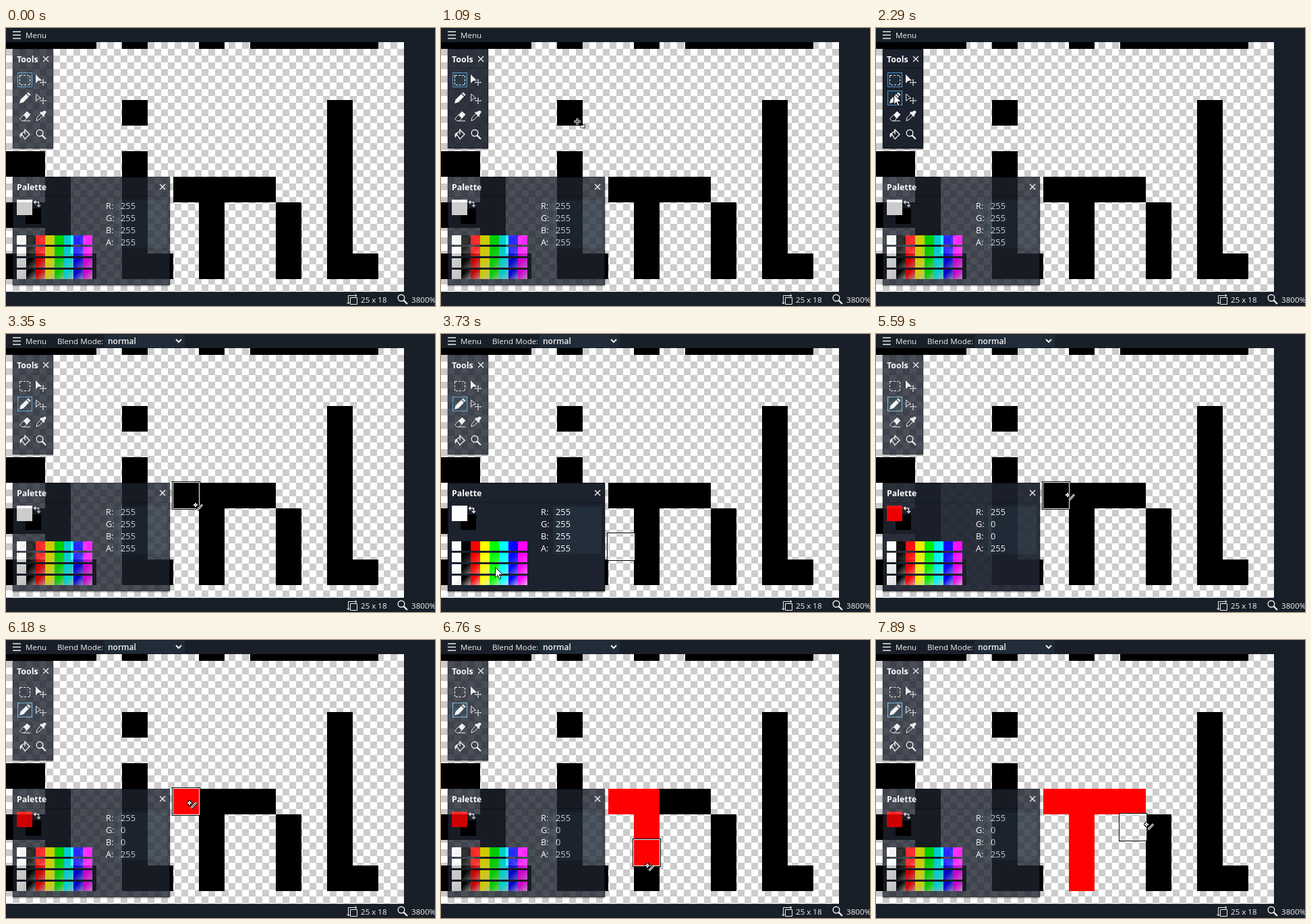
An HTML page for the animation above (7990 ms loop, 636 by 413 pixels).

```html
<!DOCTYPE html>
<html lang="en">
<head>
<meta charset="utf-8">
<title>Pixel editor</title>
<style>
html, body { margin: 0; width: 100%; height: 100%; overflow: hidden; background: #181f28; }
svg { display: block; }
text { font: 11.6px "Open Sans", "Noto Sans", sans-serif; fill: #f4f4f4; }
.title { font-size: 12.4px; font-weight: bold; fill: #fff; }
.value { font-size: 12.8px; fill: #fff; }
.line { fill: none; stroke: #f0f0f0; stroke-width: 1.4; }
.thin { stroke-width: 1; }
.panel { fill: #1b242d; stroke: #0b1015; }
.active { fill: #1d2c39; stroke: #4d94cc; }
.solid { fill: #f4f4f4; }
.crisp, .crisp * { shape-rendering: crispEdges; }
</style>
</head>
<body>
<svg width="636" height="413" viewBox="0 0 636 413">
  <defs>
    <pattern id="checker" y="21" width="20" height="20" patternUnits="userSpaceOnUse">
      <path fill="#fff" d="M0 0H20V20H0Z"/>
      <path fill="#ccc" d="M10 0H20V10H10ZM0 10H10V20H0Z"/>
    </pattern>
    <filter id="shadow" x="-10%" y="-10%" width="120%" height="120%">
      <feDropShadow dx="0" dy="1" stdDeviation="1.2" flood-opacity=".6"/>
    </filter>
    <path id="cross" class="line thin" d="M-4 0H4M0 -4V4M-4 -1V1M4 -1V1M-1 -4H1M-1 4H1"/>
    <g id="glass" class="line"><circle r="4.8"/><path d="M3.4 3.4L9 9" style="stroke-width:2.2"/></g>
    <path id="close" class="line" d="M-4 -4L4 4M4 -4L-4 4"/>
    <path id="pencilLine" d="M2.5 7.5L10 -.5"/>
  </defs>

  <g class="crisp">
    <path fill="url(#checker)" d="M0 21H590V392H0Z"/>
    <path d="M0 21H134V31H0ZM172 21H210V31H172ZM286 21H324V31H286ZM362 21H552V31H362Z
      M0 183H58V221H96V373H0V335H58V297H0V259H58V221H0ZM96 335H134V373H96Z
      M172 107H210V145H172ZM172 183H210V335H248V373H172Z
      M248 221H400V259H324V373H286V259H248ZM400 259H438V373H400Z
      M476 107H514V335H552V373H476Z"/>
    <path id="paint" fill="#f00"/>
    <g id="cell" fill="none">
      <path stroke="#000" d="M-1.5 -1.5H39.5V39.5H-1.5Z"/>
      <path stroke="#fff" d="M-.5 -.5H38.5V38.5H-.5Z"/>
    </g>
  </g>

  <path fill="#181f28" d="M0 0H636V21H0ZM0 392H636V413H0Z"/>
  <path class="line" d="M10 5.5H22M10 10.5H22M10 15.5H22"/>
  <text x="29" y="15">Menu</text>
  <g id="blend">
    <path fill="#202c38" d="M146 1H265V20H146Z"/>
    <text x="76" y="15">Blend Mode:</text>
    <text x="151" y="15" style="font-size:12px;font-weight:600">normal</text>
    <path class="line" d="M252 8L256 12L260 8" style="stroke-width:2"/>
  </g>
  <path class="line thin" d="M510.5 400.5H520.5V410.5H510.5ZM507.5 410V397.5H520M505.5 407.5L507.5 410L509.5 407.5M517.5 395.5L520 397.5L517.5 399.5"/>
  <text x="526" y="408">25 x 18</text>
  <use href="#glass" x="586" y="401"/>
  <text x="601" y="408">3800%</text>

  <g id="tools">
    <rect class="panel" x="10.5" y="31.5" width="59" height="147" filter="url(#shadow)"/>
    <path stroke="#111820" d="M11 59.5H69"/>
    <text class="title" x="16" y="51">Tools</text>
    <use href="#close" x="59" y="46"/>
    <rect id="selectBox" class="active" x="17.5" y="66.5" width="21" height="21"/>
    <rect id="pencilBox" class="active" x="17.5" y="93.5" width="21" height="21"/>
    <path class="line thin crisp" stroke-dasharray="3 2" d="M20.5 70.5H35.5V84.5H20.5Z"/>
    <path class="solid" d="M44 69V82L47.5 78.5L53 78Z"/>
    <use href="#cross" x="55" y="81"/>
    <path class="solid" d="M20 112L21.5 106.5L30 98L34 102L25.5 110.5ZM31 97L33 95.5L36.5 99L35 101Z"/>
    <path class="line thin" d="M44.7 98V108.5L48 105L52 104.5Z"/>
    <use href="#cross" x="55" y="108"/>
    <path class="solid" d="M26 129L31 124L36 128.5L30.5 134.5Z"/>
    <path class="line thin" d="M31 124L36 128.5L27 138H23.5L20.5 135L26 129M26 138H36"/>
    <path class="solid" d="M51 127L54 130L57 129L59.5 125.5Q60 122 56 123L53 125L52 124L50 126L56 132L58 130Z"/>
    <path class="line thin" d="M52 127L46 133L45 138L49 136L55 130"/>
    <path class="solid" d="M24 155Q19 156 21 163L24 159Z"/>
    <path class="line" d="M23 157L29 152L35 158L28 165ZM28 158V150"/>
    <use href="#glass" x="50" y="156"/>
  </g>

  <g id="palette">
    <rect class="panel" x="10.5" y="221.5" width="232" height="160" filter="url(#shadow)"/>
    <path stroke="#111820" d="M11 250.5H242"/>
    <text class="title" x="16" y="241">Palette</text>
    <use href="#close" x="232" y="236"/>
    <path d="M29 268H52V291H29Z"/>
    <rect id="swatch" x="16" y="255" width="23" height="23"/>
    <path class="line" d="M44 256.5L41.5 259L44 261.5M42 259H48.5V265M46 263L48.5 265.5L51 263"/>
    <path fill="#222e3a" d="M166 256H238V327H166Z"/>
    <g id="channels"></g>
    <g id="swatches" class="crisp"></g>
  </g>

  <path id="arrow" fill="#fff" stroke="#000" d="M.5 .5V16L4 12.5L6.5 18L9 17L6.5 11.5H11.5Z"/>
  <g id="pen">
    <path fill="#fff" stroke="#000" d="M-1.5 -3.5H1.5V-1.5H3.5V1.5H1.5V3.5H-1.5V1.5H-3.5V-1.5H-1.5Z"/>
    <path d="M-.5 -.5H.5V.5H-.5Z"/>
    <use href="#pencilLine" stroke="#000" stroke-width="5"/>
    <use href="#pencilLine" stroke="#fff" stroke-width="3"/>
    <use href="#pencilLine" stroke="#000"/>
  </g>
  <g id="marquee" fill="none" stroke="#000">
    <path stroke="#fff" stroke-width="3" d="M-5 0H5M0 -5V5"/>
    <path d="M-5 0H5M0 -5V5"/>
    <path stroke-dasharray="2 1" d="M4.5 4.5H11.5V9.5H4.5Z"/>
  </g>
</svg>
<script>
const LOOP = 7990, STEP = 95, CELL = 38, LEFT = 20, TOP = 31;
const SELECT_PENCIL = 2470, PICK_RED = 4920, PEN_DOWN = 6180, PEN_UP = 7850;
const $ = id => document.getElementById(id);

// Pointer gestures: start and end time, then the corners of the path
const gestures = [
  [710, 1200, [463, 239], [28, 73]],
  [2290, 2290, [26, 98]],
  [2880, 3350, [40, 112], [281, 254]],
  [3450, 3640, [266, 300], [102, 353]],
  [3730, 4030, [80, 346], [29, 320], [51, 316]],
  [4530, 4530, [51, 317]],
  [5410, 5590, [130, 290], [284, 239]],
  [5690, 5990, [300, 240], [274, 243]],
  [6180, 6270, [272, 242], [300, 243]],
  [6470, 6850, [304, 264], [306, 358]],
  [7050, 7800, [308, 335], [328, 246], [388, 246]],
  [7890, 7890, [401, 274]]
];

function along(points, progress) {
  const at = progress * (points.length - 1), i = Math.floor(at);
  const [x, y] = points[i], [nextX, nextY] = points[i + 1] || points[i];
  return { x: x + (nextX - x) * (at - i), y: y + (nextY - y) * (at - i) };
}

// The pointer is sampled in steps and rests between them
const steps = gestures.flatMap(([start, end, ...points]) => {
  const count = Math.round((end - start) / STEP);
  return Array.from({ length: count + 1 }, (_, i) => {
    const progress = count ? i / count : 0;
    return { t: start + (end - start) * progress, ...along(points, progress) };
  });
});

$("channels").innerHTML = [..."RGBA"].map((name, i) => {
  const y = 269 + 18 * i;
  return `<text class="value" x="148" y="${y}">${name}:</text><text class="value" id="value${name}" x="170" y="${y}">255</text>`;
}).join("");

const colors = ["#fff", "#000", "#f00", "#ff0", "#0f0", "#0ff", "#00f", "#f0f"];
$("swatches").innerHTML = [1, .75, .5, .25].map((alpha, row) => colors.map((color, column) => {
  const id = `fade${row}${column}`, box = `x="${16 + 14 * column}" y="${308 + 17 * row}" width="14" height="14"`;
  return `<linearGradient id="${id}" x2="1" y2="1"><stop offset=".3" stop-color="${color}"/>
    <stop offset="1" stop-color="${color}" stop-opacity="${alpha}"/></linearGradient>
    <rect ${box} fill="#e6e6e6"/><rect ${box} fill="url(#${id})"/>`;
}).join("")).join("");

const show = (id, on) => $(id).setAttribute("visibility", on ? "visible" : "hidden");
const move = (id, { x, y }) => $(id).setAttribute("transform", `translate(${x} ${y})`);
const ramp = (t, start) => Math.min(1, Math.max(0, (t - start) / 250));
const panelOpacity = (t, enter, leave) => .8 + .2 * (ramp(t, enter) - ramp(t, leave));
const inTools = p => p.x >= 10 && p.x < 70 && p.y >= 31 && p.y < 179;
const inPalette = p => p.x >= 10 && p.x < 243 && p.y >= 221 && p.y < 382;
const overCanvas = p => !inTools(p) && !inPalette(p);
const snap = (value, origin) => origin + CELL * Math.floor((value - 2 - origin) / CELL);
const cellAt = p => ({ x: snap(p.x, LEFT), y: snap(p.y, TOP) });

function draw(t) {
  const past = steps.filter(p => p.t <= t), pointer = past.at(-1);
  const pencil = t >= SELECT_PENCIL, red = t >= PICK_RED;
  const kind = !pointer ? "" : !overCanvas(pointer) ? "arrow" : pencil ? "pen" : "marquee";
  for (const id of ["arrow", "pen", "marquee"]) {
    show(id, id === kind);
    if (id === kind) move(id, { x: Math.round(pointer.x), y: Math.round(pointer.y) });
  }

  // The cell outline stays at the last canvas position
  const hover = past.filter(p => p.t > SELECT_PENCIL && overCanvas(p)).at(-1);
  show("cell", hover);
  if (hover) move("cell", cellAt(hover));

  const painted = past.filter(p => p.t >= PEN_DOWN && p.t < PEN_UP).map(cellAt);
  $("paint").setAttribute("d", painted.map(c => `M${c.x} ${c.y}h${CELL}v${CELL}h${-CELL}Z`).join(""));

  show("blend", pencil);
  show("selectBox", !pencil);
  show("pencilBox", t >= 2290);
  $("pencilBox").style.stroke = t >= 4720 ? "#68aee0" : "";
  $("tools").setAttribute("opacity", panelOpacity(t, 950, 2880));
  $("palette").setAttribute("opacity", panelOpacity(t, 3390, 5510));
  $("swatch").setAttribute("fill", red ? "#f00" : "#fff");
  $("valueG").textContent = $("valueB").textContent = red ? "0" : "255";
}

function tick() {
  draw(performance.now() % LOOP);
  requestAnimationFrame(tick);
}
tick();
</script>
</body>
</html>
```
